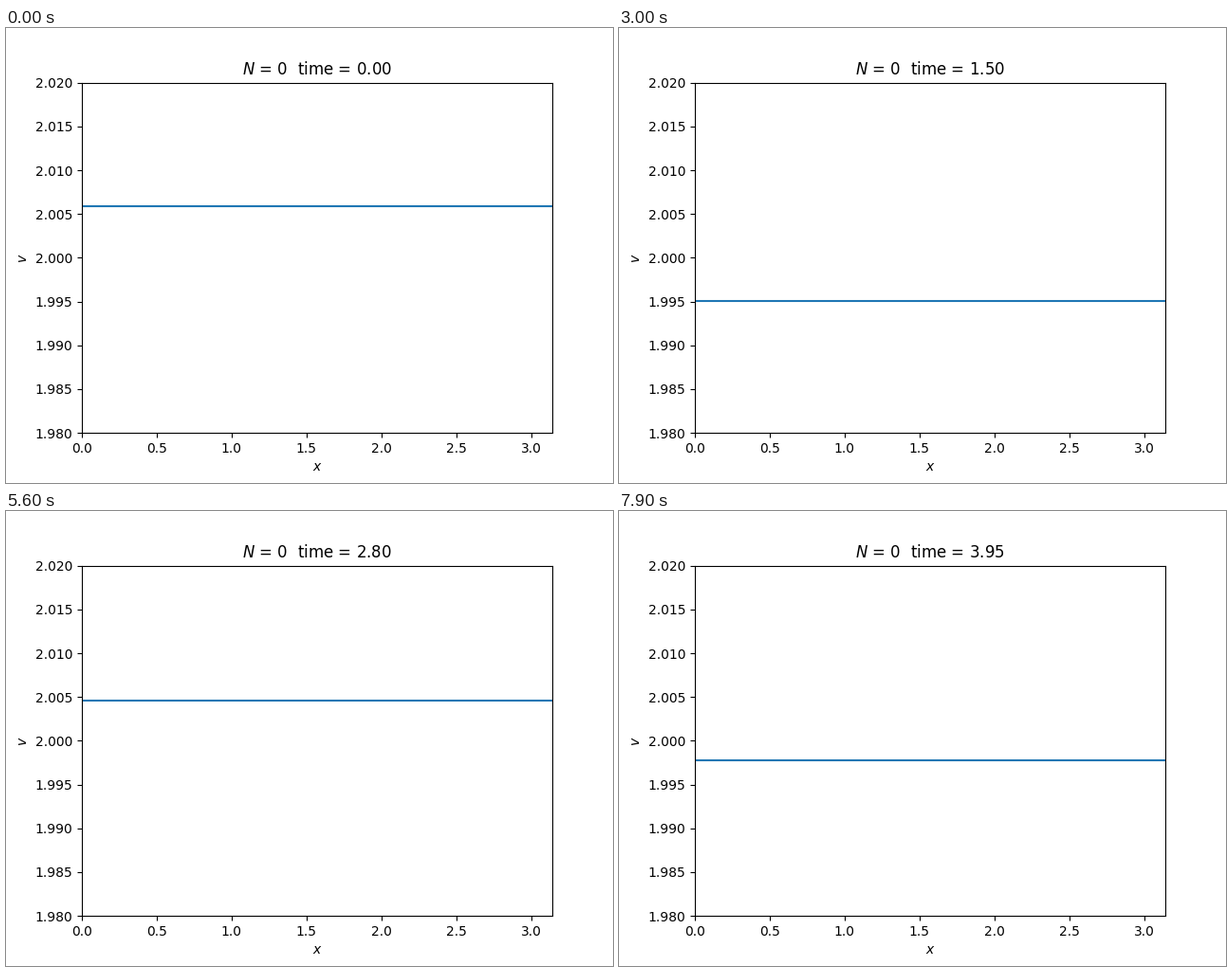
Animation, 640 px wide and 480 px high, one loop 8000 ms. Source, as a matplotlib script:

```python
import numpy as np
import matplotlib.pyplot as plt
from matplotlib.animation import FuncAnimation

FRAMES = 80
INTERVAL = 100  # ms
DT = 0.05       # model time per frame

DECAY, OMEGA = 0.505, 1.909
T0 = 1.797      # upward crossing of the steady state
AMP = 0.00803


def level(t):
    """Damped oscillation around 2 with a weak second harmonic."""
    s = t - T0
    phase = OMEGA * s
    main = AMP * np.exp(-DECAY * s) * np.sin(phase)
    harmonic = 1.16e-5 * np.cos(2 * phase) - 4.74e-5 * np.sin(2 * phase)
    return 2 + main + np.exp(-2 * DECAY * s) * harmonic


fig, ax = plt.subplots(figsize=(6.4, 4.8), dpi=100)
x = np.linspace(0, np.pi, 65)
line, = ax.plot(x, np.full_like(x, level(0)))
ax.set_xlim(0, np.pi)
ax.set_ylim(1.98, 2.02)
ax.set_xlabel("$x$")
ax.set_ylabel("$v$")
title = ax.set_title("")


def update(i):
    t = i * DT
    line.set_ydata(np.full_like(x, level(t)))
    title.set_text(f"$N$ = 0  time = {t:.2f}")
    return line, title


anim = FuncAnimation(fig, update, frames=FRAMES, interval=INTERVAL,
                     repeat=True, repeat_delay=0)
plt.show()
```
